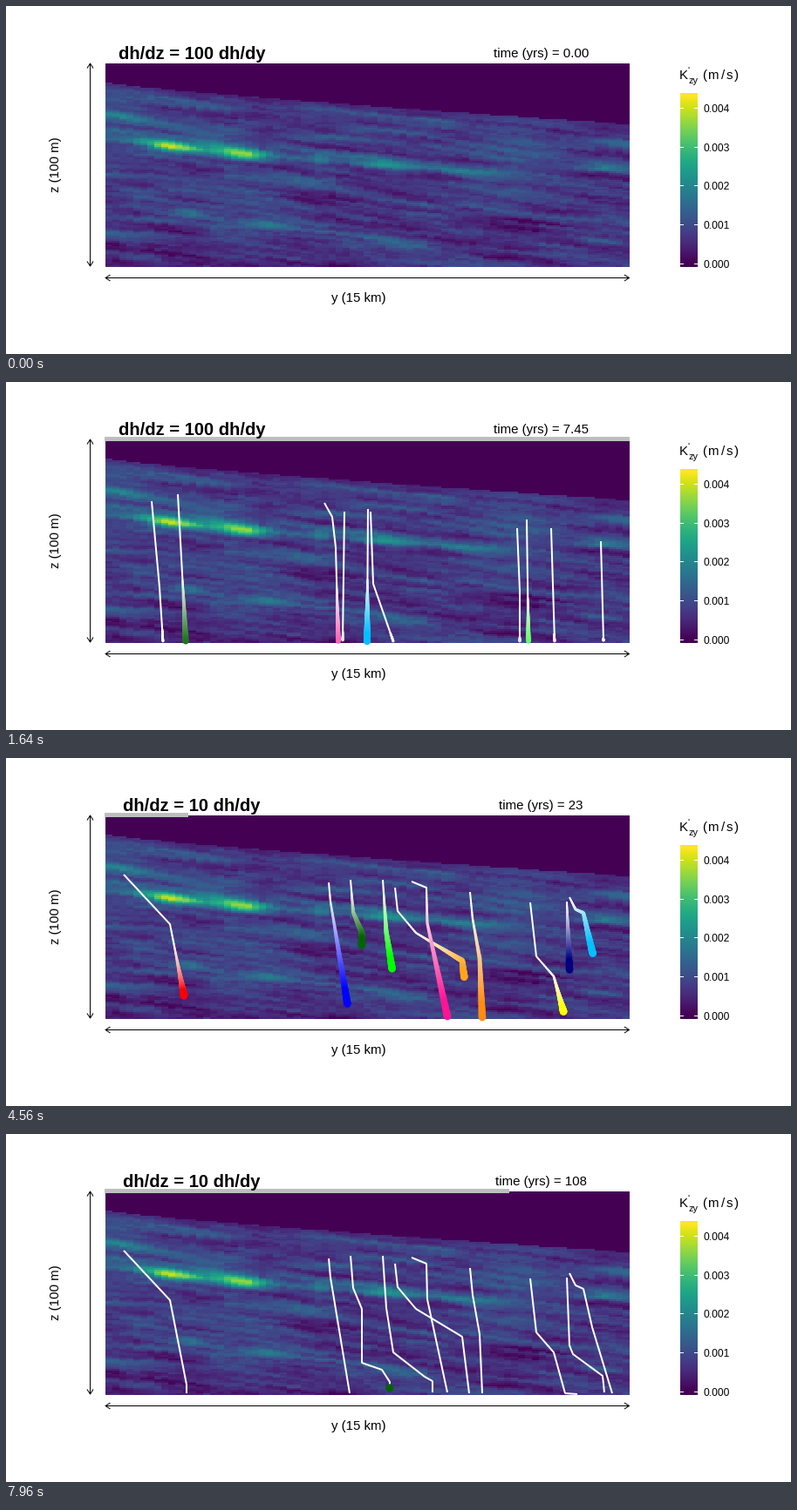
A matplotlib script that plays this animation: 900 px wide and 400 px high, repeating every 8 s.

```python
import numpy as np
import matplotlib.pyplot as plt
from matplotlib.animation import FuncAnimation
from matplotlib.collections import LineCollection
from matplotlib.colors import to_rgb

PX = 0.72  # points per pixel at 100 dpi
LEFT, RIGHT, TOP, BOTTOM = 114, 715, 66, 300
COLS, ROWS = 75, 117
DIP = 0.115
FIRST, PAUSE, SECOND = 42, 50, 140
WAKE, DOTS = 21, 80

plt.rcParams["font.family"] = "Liberation Sans"
fig = plt.figure(figsize=(9, 4), dpi=100, facecolor="white")
ax = fig.add_axes([0, 0, 1, 1])


def label(x, y, text, size=15, **kw):
    kw.setdefault("ha", "center")
    return ax.text(x, y, text, fontsize=size * PX, va="baseline", zorder=9, **kw)


def line(xs, ys, color="black"):
    ax.plot(xs, ys, color=color, lw=PX, snap=False, zorder=2,
            solid_capstyle="butt")


# ---------- conductivity section ----------

def smooth(a, sigma, axis):
    r = int(3 * sigma) + 1
    k = np.exp(-0.5 * (np.arange(-r, r + 1) / sigma) ** 2)
    return np.apply_along_axis(lambda v: np.convolve(v, k, "same"), axis, a)


def noise(rng, sx, sy):
    n = smooth(smooth(rng.normal(size=(220, COLS + 60)), sx, 1), sy, 0)
    n = n[20:200, 30:30 + COLS]
    return (n - n.mean()) / n.std()


def section():
    """Layered random field, dipping to the right, with a few bright lenses."""
    rng = np.random.default_rng(5)
    x = LEFT + (np.arange(COLS) + 0.5) * (RIGHT - LEFT) / COLS
    y = TOP + (np.arange(ROWS) + 0.5) * (BOTTOM - TOP) / ROWS
    X, Y = np.meshgrid(x, y)
    row = np.rint((Y - TOP - DIP * (X - LEFT)) / 2 + 40).astype(int)
    col = np.broadcast_to(np.arange(COLS), row.shape)
    f = 0.84 - 0.0015 * (Y - 150)
    for sx, sy, weight in [(2.5, 0.8, 0.17), (5, 1.8, 0.17), (0.5, 0.6, 0.09)]:
        f += weight * noise(rng, sx, sy)[row, col]
    for cx, cy, reach, gain in [(187, 161, 22, 2.0), (232, 166, 55, 1.6),
                                (273, 171, 18, 1.9), (130, 127, 38, 1.1),
                                (362, 177, 10, 0.8), (440, 183, 28, 1.3),
                                (515, 189, 45, 0.8), (692, 186, 24, 0.9),
                                (211, 238, 16, 0.9), (300, 250, 28, 0.8),
                                (452, 271, 25, 0.6), (690, 271, 38, 0.8)]:
        dx = X - cx
        dy = Y - cy - DIP * dx
        f += gain * np.exp(-(dx / reach) ** 2 / 1.6 - (dy / 5) ** 2 / 1.6)
    surface = 88 + 48 * ((x - LEFT) / (RIGHT - LEFT)) ** 0.85
    f *= np.clip(0.55 + (Y - surface) / 22, 0.55, 1)
    return np.where(Y < surface, 0, np.clip(f, 0.05, None))


scale = dict(cmap="viridis", vmin=0, vmax=4.35, aspect="auto",
             interpolation="nearest")
ax.imshow(section(), extent=(LEFT, RIGHT, BOTTOM, TOP), zorder=1, **scale)
ax.imshow(np.linspace(4.4, -0.1, 200)[:, None], extent=(773, 793, 300, 100),
          zorder=1, **scale)
ax.set_xlim(0, 900)
ax.set_ylim(400, 0)
ax.axis("off")

# ---------- axes and legend ----------

line([96.5, 96.5], [66, 299])
line([114, 714.5], [312.5, 312.5])
for tip, way in [(66, 1), (299, -1)]:
    line([93, 96.5, 100], [tip + 5.5 * way, tip, tip + 5.5 * way])
for tip, way in [(114, 1), (714.5, -1)]:
    line([tip + 5.5 * way, tip, tip + 5.5 * way], [309, 312.5, 316])
label(404.5, 340, "y (15 km)")
ax.text(56.5, 182, "z (100 m)", fontsize=15 * PX, rotation=90,
        ha="center", va="center")

for i in range(5):
    ty = int(296.5 - 44.8 * i) + 0.5
    label(800, ty + 4.5, f"{i / 1000:.3f}", 12, ha="left")
    line([773, 777], [ty, ty], "white")
    line([789, 793], [ty, ty], "white")
for x, s in zip([771.5, 798.5, 804, 819.5, 825.5, 834.5], "K(m/s)"):
    label(x, 84, s, ha="left")
label(781.5, 78, "'", 11, ha="left")
label(782.5, 89, "zy", 11, ha="left")

# ---------- particles ----------

first, second = [], []


def add(group, color, steps, pace, *points, stay=False):
    """Follow the points for some steps; a pace above 1 slows towards the end."""
    x, y = np.array(points, float).T
    s = np.append(0, np.cumsum(np.hypot(np.diff(x), np.diff(y))))
    along = np.linspace(0, s[-1], 150)
    t = steps * (along / s[-1]) ** pace
    xy = np.column_stack([np.interp(along, s, x), np.interp(along, s, y)])
    if stay:
        t, xy = np.append(t, SECOND), np.vstack([xy, xy[-1]])
    group.append((np.array(to_rgb(color)), t, xy))


PINK, SKY, AMBER, ORANGE = "#ff1493", "#00bfff", "#ffa51a", "#ff8c10"
NAVY, GREEN = "#00007f", "#006400"

add(first, "yellow", 22, 1, (167, 137), (176, 236), (180, 298))
add(first, GREEN, 36, 1.1, (197, 129), (203, 238), (206, 298))
add(first, PINK, 32, 1, (365, 139), (374, 155), (378, 190), (381, 298))
add(first, NAVY, 22, 1.3, (388, 149), (386, 297))
add(first, SKY, 40, 1.1, (415, 146), (414, 298))
add(first, ORANGE, 22, 1.4, (418, 149), (421, 232), (444, 298))
add(first, "blue", 22, 2, (586, 168), (589, 240), (589, 298))
add(first, "lime", 31, 1, (597, 158), (599, 298))
add(first, "red", 22, 1.4, (625, 168), (629, 298))
add(first, AMBER, 22, 4, (682, 183), (685, 297))

add(second, "red", 45, 5, (135, 134), (188, 191), (207, 288), (207, 298))
add(second, "blue", 25, 1.2, (370, 143), (372, 165), (394, 298))
add(second, GREEN, 71, 1.45, (395, 140), (398, 177), (408, 201), (408, 263),
    (431, 271), (440, 285), (440, 292), stay=True)
add(second, "lime", 45, 1.27, (432, 140), (436, 200), (444, 251), (480, 279),
    (489, 284), (489, 297))
add(second, AMBER, 45, 2.5, (446, 149), (449, 176), (470, 201), (523, 233),
    (531, 298))
add(second, PINK, 22, 1.3, (465, 142), (482, 149), (483, 190), (506, 297))
add(second, ORANGE, 22, 1.3, (532, 154), (535, 185), (543, 230), (546, 298))
add(second, "yellow", 45, 5, (601, 166), (608, 228), (628, 251), (641, 298),
    (655, 299))
add(second, NAVY, 45, 1.1, (643, 165), (646, 243), (650, 253), (684, 278),
    (686, 297))
add(second, SKY, 45, 1, (646, 160), (653, 174), (662, 178), (672, 222),
    (695, 298))

paths = LineCollection([], colors="white", linewidths=2 * PX, zorder=4)
ax.add_collection(paths)
wakes = ax.scatter([], [], linewidths=0, zorder=5)
bar = ax.fill([0, 0, 0, 0], [63, 63, 68, 68], color="#bebebe", lw=0, zorder=3)[0]
title = label(213, 61, "", 20.1, weight="bold")
clock = label(613.3, 59, "")


def place(at, t, xy):
    return np.column_stack([np.interp(at, t, xy[:, i]) for i in (0, 1)])


def wake(step, color, t, xy):
    """Dots of the last steps, fading to white and thinning with age."""
    now, start = min(step, t[-1]), max(0, step - WAKE)
    if start >= now:
        return None
    at = np.linspace(start, now, DOTS)
    fresh = 1 - (step - at) / WAKE
    tint = np.clip(1.15 * fresh, 0, 1)[:, None]
    return place(at, t, xy), ((2 + 6.6 * fresh) * PX) ** 2, 1 - tint * (1 - color)


def so_far(step, color, t, xy):
    return np.vstack([xy[t < step], place([step], t, xy)])


def draw(n):
    if n < FIRST + PAUSE:
        step, group, total, ratio = min(n, FIRST - 1), first, FIRST - 1, 100
        clock.set_text(f"time (yrs) = {step * 2 / 11:.2f}")
    else:
        step, group, total, ratio = n - FIRST - PAUSE, second, SECOND - 1, 10
        clock.set_text(f"time (yrs) = {step + 1}")
    title.set_text(f"dh/dz = {ratio} dh/dy")

    end = LEFT + (RIGHT - LEFT) * step / total
    begin = LEFT - 1 if step else end
    bar.set_xy([(begin, 63), (end, 63), (end, 68), (begin, 68)])

    paths.set_segments([so_far(step, *p) for p in group] if step else [])
    trails = [w for w in (wake(step, *p) for p in group) if w]
    if trails:
        xy, sizes, colors = map(np.concatenate, zip(*trails))
    else:
        xy, sizes, colors = np.empty((0, 2)), np.empty(0), np.empty((0, 3))
    wakes.set_offsets(xy)
    wakes.set_sizes(sizes)
    wakes.set_facecolors(colors)
    return paths, wakes, bar, title, clock


anim = FuncAnimation(fig, draw, frames=200, interval=40, repeat=True,
                     repeat_delay=0, blit=False)
plt.show()
```
